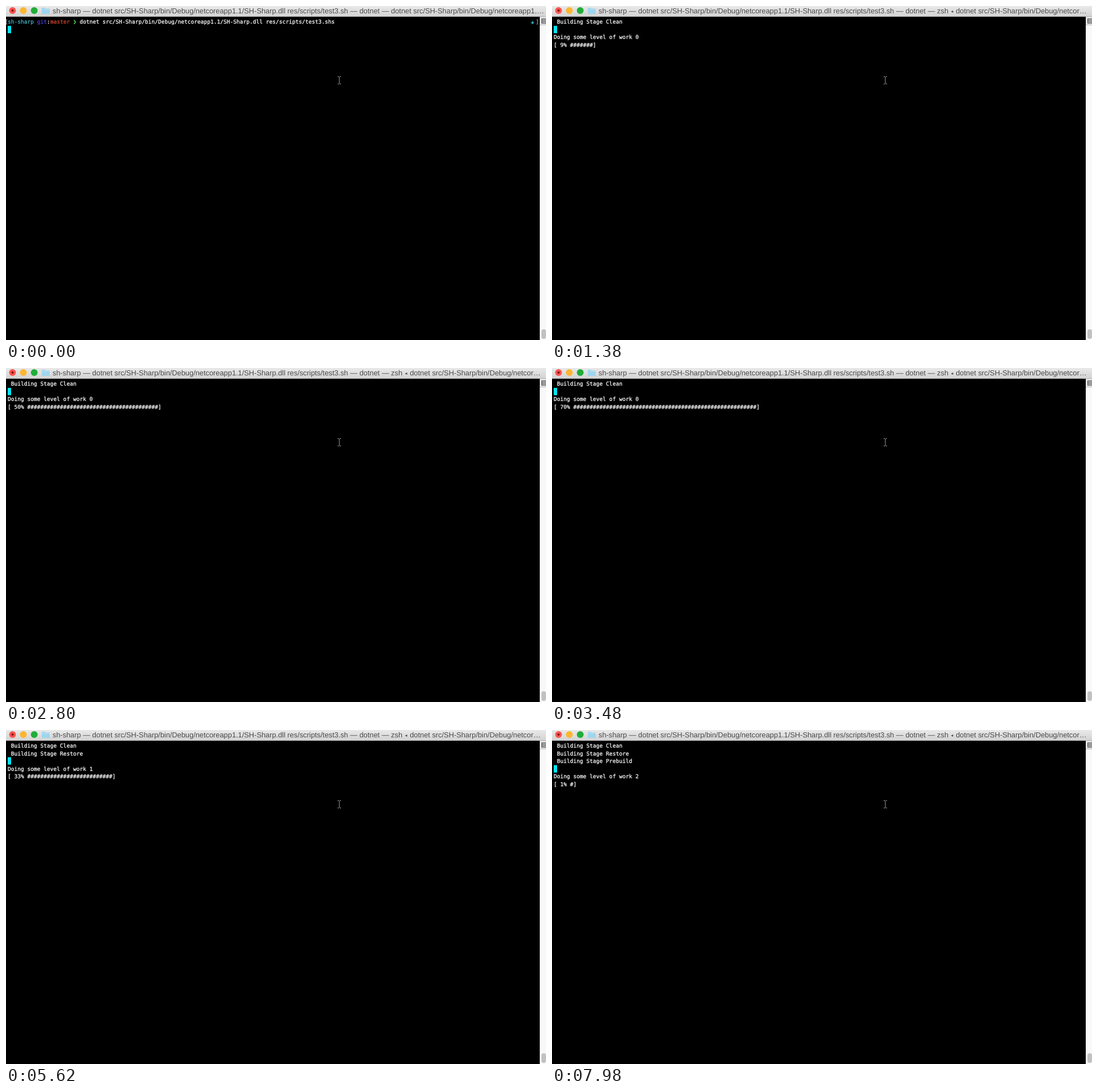
An HTML page for the animation above (8000 ms loop, 951 by 589 pixels).

```html
<!DOCTYPE html>
<html lang="en">
<head>
<meta charset="utf-8">
<title>Terminal build progress</title>
<style>
  html, body { margin: 0; width: 100%; height: 100%; overflow: hidden; background: #000; }
  #stage { position: relative; width: 951px; height: 589px; overflow: hidden; background: #000; text-rendering: geometricPrecision; }
  #stage > * { position: absolute; }
  svg { left: 0; top: 0; }
  #title { left: 82px; top: 0; margin: 0; font: 12.84px/17px "Liberation Sans", "DejaVu Sans", sans-serif; color: #4a4a4a; white-space: pre; }
  #title small { font-size: 8px; padding: 0 1px; vertical-align: 1px; }
  pre { margin: 0; font: 9.57px/13.5px "DejaVu Sans Mono", monospace; color: #fff; -webkit-text-stroke: .25px; }
  #screen { left: 3px; top: 22px; }
  #cursor { left: 3px; width: 6px; height: 13px; background: #00e5f5; }
  .dir { color: #3cb9cb; }
  .git { color: #4a3fe0; }
  .branch { color: #d4432c; }
  .arrow { color: #55e060; display: inline-block; width: 1ch; }
  .mark { color: #a0a0a0; top: 22px; }
  .star { color: #3cb9cb; font-size: 11px; }
</style>
</head>
<body>
<div id="stage">
  <svg width="951" height="589">
    <defs>
      <linearGradient id="bar" x2="0" y2="1">
        <stop offset="0" stop-color="#e9e9e9"/><stop offset="1" stop-color="#d2d2d2"/>
      </linearGradient>
    </defs>
    <rect width="951" height="19" fill="url(#bar)"/>
    <rect y="18" width="951" height="1" fill="#b4b4b4"/>
    <circle cx="11.5" cy="8" r="6" fill="#fb5550"/>
    <circle cx="11.5" cy="8" r="2" fill="#7a0e0c"/>
    <circle cx="30.5" cy="8" r="6" fill="#fdb62f"/>
    <circle cx="49.7" cy="8" r="6" fill="#1fae38"/>
    <path d="M63 3h5l1.5 1.5H77V14H63z" fill="#9fd5ee"/>
    <path d="M63 6h14" stroke="#b9e2f4"/>
    <rect x="940" y="19" width="11" height="570" fill="#f8f8f7"/>
    <rect x="940" y="19" width="11" height="14" fill="#e4e4e4"/>
    <path d="M940 33.5h11" stroke="#bdbdbd"/>
    <path d="M943.5 22.5h8v8h-8z" fill="#eee" stroke="#444"/>
    <path d="M944 24.5h7M944 26.5h7M944 28.5h7" stroke="#444"/>
    <rect x="943" y="570" width="8" height="17" rx="4" fill="#c1c1c1"/>
    <path d="M584 124.5h2l1 1 1-1h2M587 125.5v11M584 137.5h2l1-1 1 1h2" fill="none" stroke="#a0a0a0"/>
  </svg>
  <div id="title"></div>
  <pre id="screen"></pre>
  <div id="cursor"></div>
  <pre class="mark" style="left:-2px">[</pre>
  <pre class="mark star" style="left:924px">★</pre>
  <pre class="mark" style="left:933px">]</pre>
</div>
<script>
const LOOP = 8000, CLEAR_STEP = 21;
const STAGES = ["Clean", "Restore", "Prebuild"];
const DLL = "src/SH-Sharp/bin/Debug/netcoreapp1.1/SH-Sharp.dll";
const PROMPT = '<span class="dir">sh-sharp</span> <span class="git">git</span>:<span class="branch">master</span> ' +
  `<span class="arrow">❯</span> dotnet ${DLL} res/scripts/test3.shs`;
const TITLE = `sh-sharp — dotnet ${DLL} res/scripts/test3.sh — dotnet — `;
// [step, total percent over all stages]
const PACE = [[22, 0], [29, 9], [46, 31], [74, 70], [121, 133], [148, 167], [171, 201], [172, 202]];

const byId = id => document.getElementById(id);
const title = byId("title"), screen = byId("screen"), cursor = byId("cursor");
const promptMarks = document.querySelectorAll(".mark");

// The screen refreshes three times every 140 ms: at 0, 20 and 120 ms.
function stepAt(ms) {
  const phase = ms % 140;
  return 3 * Math.floor(ms / 140) + (phase >= 120 ? 2 : phase >= 20 ? 1 : 0);
}

function totalPercent(step) {
  if (step <= PACE[0][0]) return 0;
  const i = PACE.findIndex(([s]) => s > step);
  const [s0, p0] = PACE[i - 1], [s1, p1] = PACE[i];
  return Math.floor(p0 + (p1 - p0) * (step - s0) / (s1 - s0));
}

function render(step) {
  const running = step >= CLEAR_STEP;
  let row = 1;
  title.innerHTML = TITLE + (running
    ? "zsh <small>◂</small> dotnet src/SH-Sharp/bin/Debug/netcor…"
    : "dotnet src/SH-Sharp/bin/Debug/netcoreapp1.…");
  if (running) {
    const total = totalPercent(step), stage = Math.floor(total / 100), percent = total % 100;
    row = stage + 1;
    screen.textContent = [
      ...STAGES.slice(0, row).map(name => " Building Stage " + name),
      "",
      "Doing some level of work " + stage,
      `[ ${percent}% ${"#".repeat(Math.round(percent * 0.8))}]`
    ].join("\n");
  } else {
    screen.innerHTML = PROMPT;
  }
  cursor.style.top = Math.floor(21.5 + 13.5 * row) + "px";
  promptMarks.forEach(mark => mark.hidden = running);
}

let shown = -1;
function tick() {
  const step = stepAt(performance.now() % LOOP);
  if (step !== shown) render(shown = step);
  requestAnimationFrame(tick);
}
tick();
</script>
</body>
</html>
```
